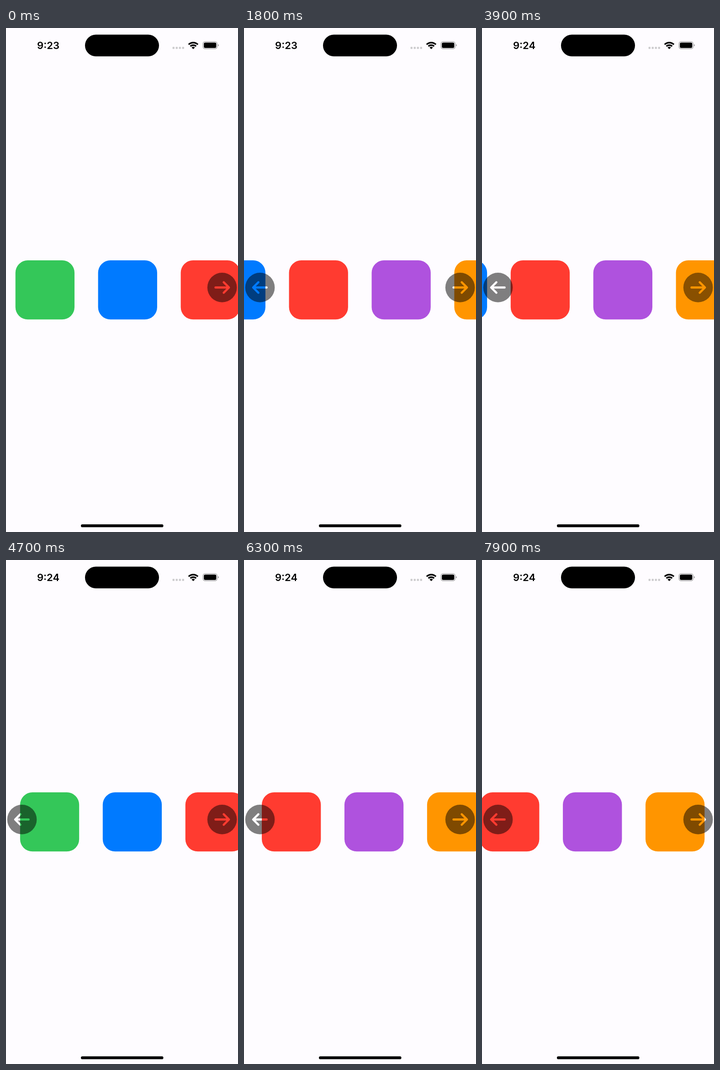
Animation of 508 by 1102 pixels, one loop 8000 ms. Source, as an HTML page:

```html
<!DOCTYPE html>
<html lang="en">
<head>
<meta charset="utf-8">
<title>Carousel with arrow buttons</title>
<style>
  html, body { margin: 0; width: 100%; height: 100%; overflow: hidden; background: #fefcff; }
  svg { display: block; width: 100%; height: 100%; }
  text { font: 600 22px Inter, "Liberation Sans", sans-serif; text-anchor: middle; }
</style>
</head>
<body>
<svg viewBox="0 0 508 1102">
  <defs>
    <mask id="arrow" maskUnits="userSpaceOnUse" x="-34" y="-34" width="68" height="68">
      <rect x="-34" y="-34" width="68" height="68" fill="#fff"/>
      <path d="M-14.5 0H14M3.5-11.5L15 0L3.5 11.5" fill="none" stroke="#000" stroke-width="4.7"
            stroke-linecap="round" stroke-linejoin="round"/>
    </mask>
    <circle id="button" r="32.3" fill-opacity=".5" mask="url(#arrow)"/>
    <clipPath id="fan"><path d="M410 46.3L392 28.3H428Z"/></clipPath>
  </defs>

  <g id="row"></g>
  <g id="left" transform="translate(35 567.4) scale(-1 1)"><use href="#button"/></g>
  <g id="right" transform="translate(473.2 567.4)"><use href="#button"/></g>

  <text id="clock" x="92.5" y="46">9:23</text>
  <rect x="173" y="14.5" width="162" height="47.5" rx="23.75"/>
  <g id="dots" fill="#cccbcd"></g>
  <g clip-path="url(#fan)">
    <circle cx="410" cy="46.3" r="5.2"/>
    <g fill="none" stroke="#000" stroke-width="3.5">
      <circle cx="410" cy="46.3" r="8.9"/>
      <circle cx="410" cy="46.3" r="14.4"/>
    </g>
  </g>
  <rect x="431.2" y="29.7" width="31.2" height="16" rx="5" fill="none" stroke="#a3a2a4" stroke-width="1.3"/>
  <rect x="433.2" y="31.7" width="27.2" height="12" rx="3.2"/>
  <path d="M464 35.2Q466.2 36 466.2 37.7T464 40.2Z" fill="#a3a2a4"/>
  <rect x="164" y="1085.3" width="180.6" height="6.3" rx="3.1"/>
</svg>
<script>
const LOOP = 8000, STEP = 100;
const SIZE = 129.3, PITCH = 180.96, INSET = 20.7;
const END = 386.5, FLICK = 303, REST = 336.4, DRAG = 369;
const COLORS = ["#34c759", "#007aff", "#ff3b30", "#af52de", "#ff9500"];

const $ = id => document.getElementById(id);

function addRect(parent, attrs) {
  const rect = document.createElementNS("http://www.w3.org/2000/svg", "rect");
  for (const name in attrs) rect.setAttribute(name, attrs[name]);
  parent.append(rect);
}

COLORS.forEach((fill, i) => addRect($("row"), {
  x: INSET + i * PITCH, y: 508, width: SIZE, height: SIZE, rx: 27, fill
}));
for (let i = 0; i < 4; i++) {
  addRect($("dots"), { x: 364.6 + i * 7, y: 41.3, width: 4.4, height: 4.4, rx: 1.2 });
}

const linear = u => u;
const easeIn = u => u * u;
const easeOut = u => u * (2 - u);
const smooth = u => u * u * (3 - 2 * u);

function ramp(t, start, end, ease = smooth) {
  return ease(Math.min(1, Math.max(0, (t - start) / (end - start))));
}

// Critically damped overscroll, reaching 1 at the peak time
function bounce(t, peak) {
  const u = Math.max(0, (t - peak) / 120 + 1);
  return u * Math.exp(1 - u);
}

function scrollAt(t) {
  const toEnd = FLICK * ramp(t, 1200, 2000, easeOut)
    + (END - FLICK) * ramp(t, 2000, 2120, linear) + 56.5 * bounce(t, 2300);
  const back = END * ramp(t, 3650, 4252, easeIn) + 48 * bounce(t, 4350);
  const again = REST * ramp(t, 5400, 5700)
    + (DRAG - REST) * ramp(t, 6100, 7000, linear)
    + (END - DRAG) * ramp(t, 7100, 7900, linear);
  return toEnd - back + again;
}

function draw(t) {
  $("row").setAttribute("transform", `translate(${-scrollAt(t)} 0)`);
  $("left").setAttribute("opacity", ramp(t, 1300, 1650) - ramp(t, 4800, 5100) + ramp(t, 5500, 5850));
  $("right").setAttribute("opacity", 1 - ramp(t, 2950, 3200) + ramp(t, 3650, 3950));
  $("clock").textContent = t < 1900 ? "9:23" : "9:24";
}

const origin = performance.now();
function frame() {
  const t = (performance.now() - origin) % LOOP;
  draw(Math.floor(t / STEP) * STEP);
  requestAnimationFrame(frame);
}
frame();
</script>
</body>
</html>
```
